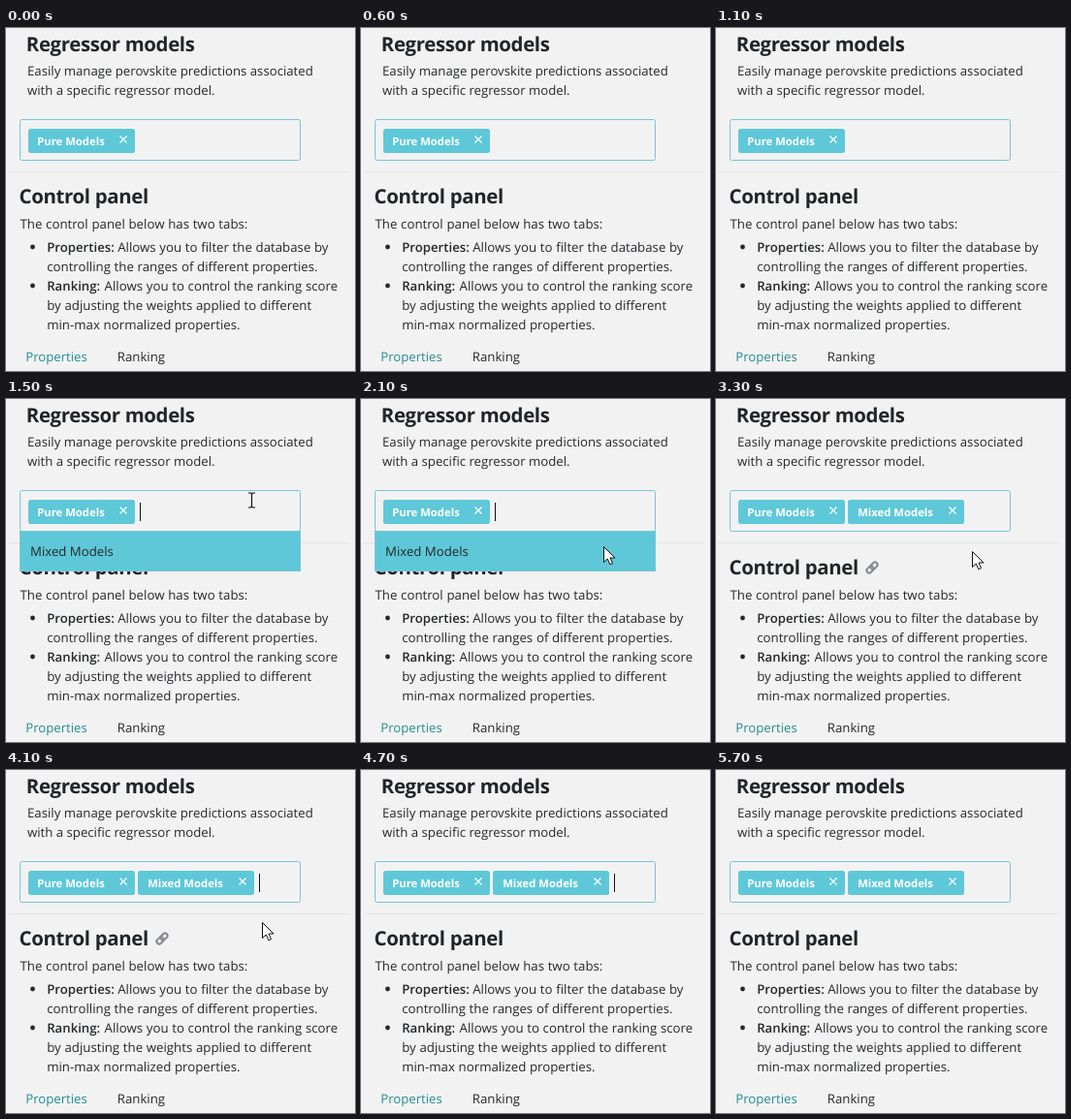
Animation of 360 by 354 pixels, one loop 5800 ms. Source, as an HTML page:

```html
<!DOCTYPE html>
<html lang="en">
<head>
<meta charset="utf-8">
<title>Regressor models</title>
<style>
html, body { margin: 0; width: 100%; height: 100%; overflow: hidden; background: #f2f2f2; }
svg { display: block; width: 360px; height: 354px; }
text {
  font: 13.2px "Open Sans", "Noto Sans", sans-serif;
  fill: #25282b;
  text-rendering: geometricPrecision;
}
.list text { font-size: 13.25px; word-spacing: .25px; }
.list .label { font-weight: 600; font-size: 13.2px; word-spacing: 0; }
.title { font-weight: 700; font-size: 20.4px; letter-spacing: -.35px; fill: #212529; }
.chip rect { fill: #5ec8d8; }
.chip text { font-weight: 700; font-size: 11.3px; fill: #fff; }
.chip path { stroke: #fff; stroke-width: 1.2; }
.frame { fill: none; stroke: #78c4d8; }
.tab { fill: #258d93; }
.hidden { visibility: hidden; }
</style>
</head>
<body>
<svg viewBox="0 0 360 354">
  <rect width="360" height="354" fill="#f2f2f2"/>
  <text class="title" x="20.8" y="24">Regressor models</text>
  <text x="22" y="49">Easily manage perovskite predictions associated</text>
  <text x="22" y="69">with a specific regressor model.</text>

  <path d="M3 148.5H354" stroke="#e3e4e5"/>
  <text class="title" x="13.6" y="181">Control panel</text>
  <g id="link" fill="none" stroke="#85888b" stroke-width="2" transform="translate(161 174) rotate(-45)">
    <rect x="-6.8" y="-2.6" width="8" height="5.2" rx="2.6"/>
    <rect x="-1.2" y="-2.6" width="8" height="5.2" rx="2.6"/>
  </g>

  <g class="list">
    <text x="14.5" y="207">The control panel below has two tabs:</text>
    <circle cx="27.5" cy="226" r="2.4" fill="#25282b"/>
    <text class="label" x="42.2" y="231">Properties:</text>
    <text x="115.2" y="231">Allows you to filter the database by</text>
    <text x="42.2" y="251">controlling the ranges of different properties.</text>
    <circle cx="27.5" cy="266" r="2.4" fill="#25282b"/>
    <text class="label" x="42.2" y="271">Ranking:</text>
    <text x="101.6" y="271">Allows you to control the ranking score</text>
    <text x="42.2" y="291">by adjusting the weights applied to different</text>
    <text x="42.2" y="311">min-max normalized properties.</text>
  </g>
  <text class="tab" x="20.2" y="344">Properties</text>
  <text x="114.8" y="344">Ranking</text>

  <rect class="frame" x="14.5" y="94.5" width="289" height="42" rx="2"/>
  <g class="chip">
    <rect x="23" y="104" width="110" height="25" rx="2.5"/>
    <text x="32.2" y="121">Pure Models</text>
    <path d="M117.5 111.5l7 7m0-7l-7 7"/>
  </g>
  <g class="chip" id="added">
    <rect x="136" y="104" width="120" height="25" rx="2.5"/>
    <text x="146.2" y="121">Mixed Models</text>
    <path d="M240.5 111.5l7 7m0-7l-7 7"/>
  </g>
  <rect id="caret" y="107" width="1" height="19" fill="#111"/>

  <g id="menu">
    <rect id="menuFill" x="14" y="136" width="290" height="42"/>
    <rect class="frame" x="14.5" y="136.5" width="289" height="41"/>
    <text id="menuText" x="25" y="162"></text>
  </g>

  <path id="beam" d="M-3.5 -7.5H-1L0 -6.5L1 -7.5H3.5M0 -6.5V6.5M-3.5 7.5H-1L0 6.5L1 7.5H3.5" fill="none" stroke="#111" stroke-width="1.2"/>
  <path id="arrow" d="M0 0V16L3.8 12.5L6.4 18.3L9 17.1L6.5 11.5H11.5Z" fill="#fff" stroke="#111"/>
</svg>
<script>
const LOOP = 5800, STEP = 100;
const OPEN = 1300, PICK = 2500, CLOSE = 2700;
const ENTER = 1200, LEAVE = 4500;

// Pointer path: time, x, y
const path = [
  [1200, 320, 112], [1300, 253, 104], [1800, 253, 104],
  [2200, 249, 161], [2700, 249, 161], [3200, 264, 157],
  [4300, 264, 157], [4500, 332, 168]
];

const el = id => document.getElementById(id);
const [link, added, caret, menu, menuFill, menuText, beam, arrow] =
  ["link", "added", "caret", "menu", "menuFill", "menuText", "beam", "arrow"].map(el);
const show = (node, on) => node.classList.toggle("hidden", !on);
const ease = u => u * u * (3 - 2 * u);

function pointerAt(t) {
  const i = path.findIndex(p => p[0] > t);
  if (i < 1) return path[i < 0 ? path.length - 1 : 0].slice(1);
  const [t0, x0, y0] = path[i - 1], [t1, x1, y1] = path[i];
  const u = ease((t - t0) / (t1 - t0));
  return [Math.round(x0 + (x1 - x0) * u), Math.round(y0 + (y1 - y0) * u)];
}

function draw(t) {
  const picked = t >= PICK;
  const blinkFrom = picked ? 2800 : OPEN;
  show(added, picked);
  show(menu, t >= OPEN && t < CLOSE);
  menuFill.setAttribute("fill", picked ? "#ebebeb" : "#5ec8d8");
  menuText.textContent = picked ? "No choices to choose from" : "Mixed Models";

  caret.setAttribute("x", picked ? 261 : 138);
  show(caret, t >= blinkFrom && (t - blinkFrom) % 600 < 300);

  const [x, y] = pointerAt(t);
  const active = t >= ENTER && t < LEAVE;
  const overInput = y < 137;
  show(beam, active && overInput);
  show(arrow, active && !overInput);
  show(link, active && t >= CLOSE);
  for (const node of [beam, arrow]) {
    node.setAttribute("transform", `translate(${x + .5} ${y + .5})`);
  }
}

const start = performance.now();
function tick() {
  const t = (performance.now() - start) % LOOP;
  draw(Math.floor(t / STEP) * STEP);
  requestAnimationFrame(tick);
}
tick();
</script>
</body>
</html>
```
